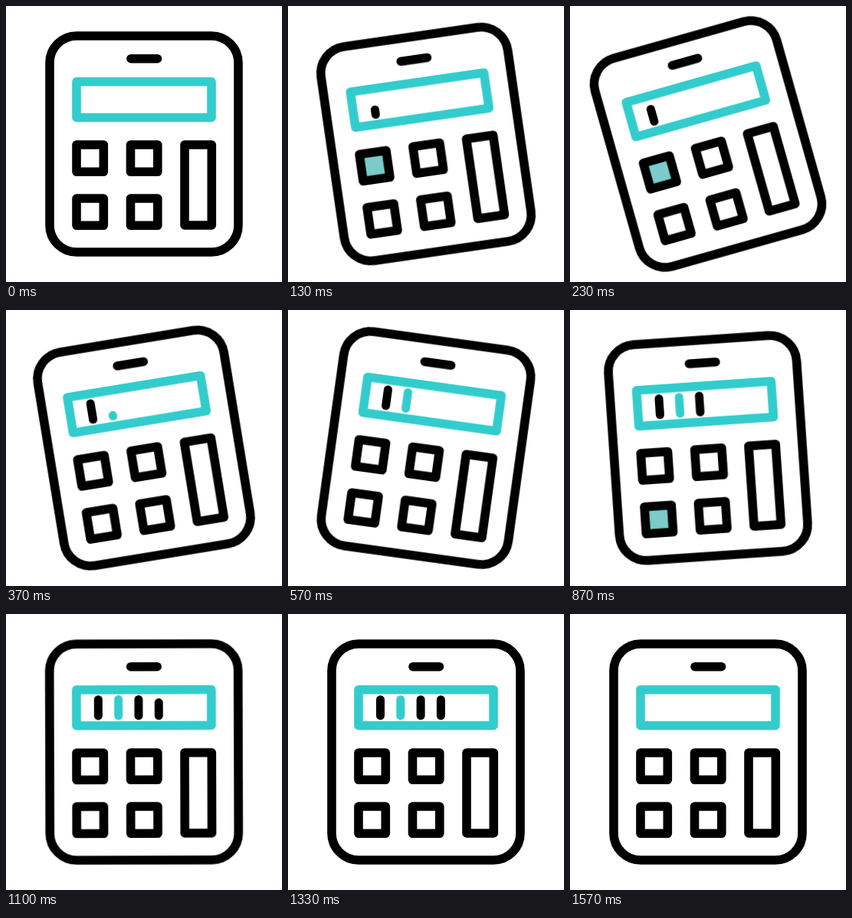
An HTML page for the animation above (1.67 s loop, 360 by 360 pixels).

```html
<!DOCTYPE html>
<html lang="en">
<head>
<meta charset="utf-8">
<title>Calculator</title>
<style>
  html, body { margin: 0; width: 100%; height: 100%; overflow: hidden; background: #fff; }
  svg { display: block; width: 100vw; height: 100vh; }
  #calc { fill: none; stroke: #000; stroke-width: 11.6; stroke-linecap: round; stroke-linejoin: round; transform-origin: 180px 180px; }
  #calc .accent { stroke: #33cccc; }
  #calc .flash { fill: #7bcbcb; stroke: none; opacity: 0; }
  #calc .digit { stroke-width: 11; stroke-dasharray: 21 60; opacity: 0; }
</style>
</head>
<body>
<svg viewBox="0 0 360 360">
  <g id="calc">
    <rect x="57" y="39" width="246" height="282" rx="35"/>
    <path d="M163 68.7H197.5"/>
    <rect class="accent" x="92" y="98.7" width="176" height="46.8"/>
    <rect x="233" y="181" width="35.3" height="105"/>
  </g>
</svg>
<script>
const LOOP = 1670;
const SMOOTH = 'cubic-bezier(.3333, 0, .6667, 1)';
const calc = document.getElementById('calc');

function add(tag, attrs) {
  const el = document.createElementNS('http://www.w3.org/2000/svg', tag);
  for (const name in attrs) el.setAttribute(name, attrs[name]);
  return calc.appendChild(el);
}

// steps: [time in ms, value, easing to the next step]
function play(el, prop, steps) {
  const frames = steps.map(([ms, value, easing = 'linear']) =>
    ({ offset: ms / LOOP, [prop]: value, easing }));
  const anim = el.animate(frames, { duration: LOOP, iterations: Infinity });
  anim.startTime = document.timeline.currentTime;
}

// Damped swing
const swing = [[0, 0], [262, -16.4], [567, 7.9], [867, -3.9], [1133, 0], [LOOP, 0]];
play(calc, 'transform', swing.map(([ms, deg]) => [ms, `rotate(${deg}deg)`, SMOOTH]));

// Keys, each lit once while pressed
const presses = [[0, 275], [385, 545], [735, 965], [1105, 1330]];
presses.forEach(([on, off], i) => {
  const box = { x: 92 + (i % 2) * 70.5, y: 181 + (i >> 1) * 70, width: 35.3, height: 35.3 };
  const flash = add('rect', { ...box, class: 'flash' });
  add('rect', box);
  play(flash, 'opacity', [
    [0, 0], [on, 0], [on + 40, 1], [off - 30, 1], [off, 0], [LOOP, 0]
  ]);
});

// Digits grow upwards one by one, then retract together
for (let i = 0; i < 4; i++) {
  const start = 70 + i * 289;
  const digit = add('path', {
    d: `M${120.5 + i * 26.3} 132.5v-21`,
    class: i === 1 ? 'digit accent' : 'digit'
  });
  play(digit, 'strokeDashoffset', [
    [0, '21px'], [start, '21px'], [start + 204, '0px'],
    [1320, '0px', SMOOTH], [1560, '21px'], [LOOP, '21px']
  ]);
  play(digit, 'opacity', [
    [0, 0], [start, 0], [start, 1], [1560, 1], [1560, 0], [LOOP, 0]
  ]);
}
</script>
</body>
</html>
```
